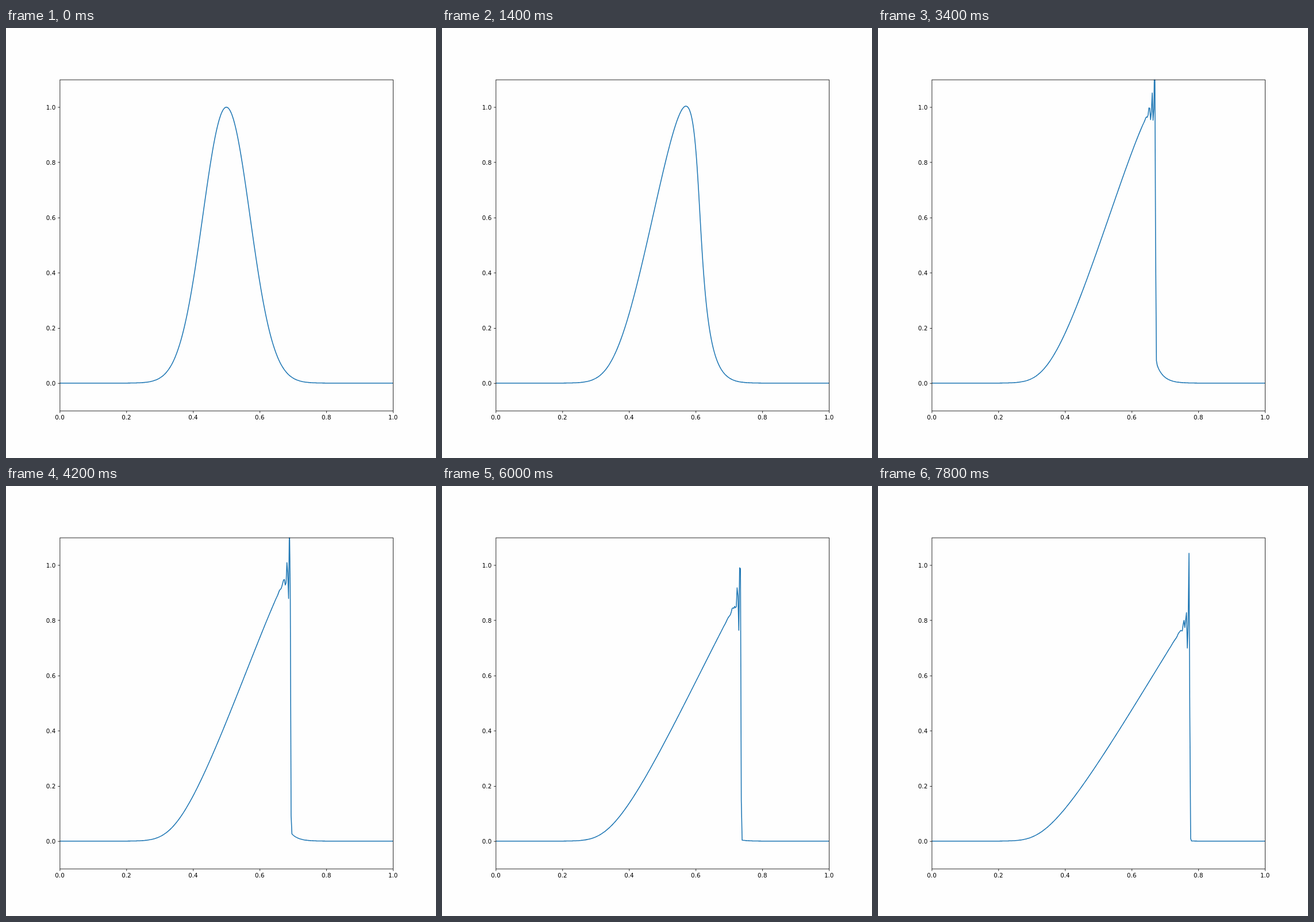
Recreate the animation shown at these times as an HTML page. Size 748 by 748 pixels, loop 8000 ms.

```html
<!DOCTYPE html>
<html lang="en">
<head>
<meta charset="utf-8">
<title>Steepening wave</title>
<style>
  html, body { margin: 0; width: 100%; height: 100%; overflow: hidden; background: #fefefe; }
  svg { display: block; width: 100%; height: 100%; }
  text { font: 13.89px "DejaVu Sans", sans-serif; fill: #000; }
  .axis { fill: none; stroke: #000; stroke-width: 1.11; }
  #wave { fill: none; stroke: #1f77b4; stroke-width: 2.08; stroke-linejoin: round; }
</style>
</head>
<body>
<svg viewBox="0 0 1000 1000">
  <clipPath id="inside"><rect x="125" y="120" width="775" height="770"/></clipPath>
  <path id="wave" clip-path="url(#inside)"/>
  <rect class="axis" x="125.5" y="120.5" width="775" height="770"/>
  <g id="ticks"></g>
</svg>
<script>
const LEFT = 125, WIDTH = 775, BOTTOM = 890, UNIT_Y = 770 / 1.2;
const POINTS = 400, COURANT = 0.8, DAMPING = 0.75, STEPS_PER_FRAME = 5;
const FRAMES = 40, FRAME_MS = 200;

const toX = x => LEFT + WIDTH * x;
const toY = u => BOTTOM - UNIT_Y * (u + 0.1);
const snap = value => Math.round(value) + 0.5;

function addNode(name, attributes, content = '') {
  const node = document.createElementNS('http://www.w3.org/2000/svg', name);
  for (const key in attributes) node.setAttribute(key, attributes[key]);
  node.textContent = content;
  document.getElementById('ticks').append(node);
}

function addTicks() {
  for (let i = 0; i <= 5; i++) {
    const value = i / 5, label = value.toFixed(1);
    const x = toX(value), y = toY(value);
    addNode('path', { class: 'axis', d: `M${snap(x)} 890.5v4.86M125.5 ${snap(y)}h-4.86` });
    addNode('text', { x, y: 911, 'text-anchor': 'middle' }, label);
    addNode('text', { x: 115.3, y: y + 5.3, 'text-anchor': 'end' }, label);
  }
}

// Lax-Wendroff flux for the inviscid Burgers equation, with reduced damping
function flux(a, b) {
  const fa = a * a / 2, fb = b * b / 2;
  return (fa + fb) / 2 - DAMPING * COURANT / 4 * (a + b) * (fb - fa);
}

function advance(u) {
  return u.map((value, i) => i === 0 || i === POINTS - 1
    ? value
    : value - COURANT * (flux(value, u[i + 1]) - flux(u[i - 1], value)));
}

function toPath(u) {
  return 'M' + u.map((value, i) =>
    toX(i / (POINTS - 1)).toFixed(2) + ' ' + toY(value).toFixed(2)).join('L');
}

function buildPaths() {
  let u = Array.from({ length: POINTS }, (_, i) =>
    Math.exp(-100 * (i / (POINTS - 1) - 0.5) ** 2));
  const paths = [];
  for (let frame = 0; frame < FRAMES; frame++) {
    paths.push(toPath(u));
    for (let step = 0; step < STEPS_PER_FRAME; step++) u = advance(u);
  }
  return paths;
}

addTicks();
const wave = document.getElementById('wave');
const paths = buildPaths();
const start = performance.now();
let shown = -1;

function draw() {
  const frame = Math.floor((performance.now() - start) / FRAME_MS) % FRAMES;
  if (frame !== shown) wave.setAttribute('d', paths[shown = frame]);
  requestAnimationFrame(draw);
}
draw();
</script>
</body>
</html>
```
